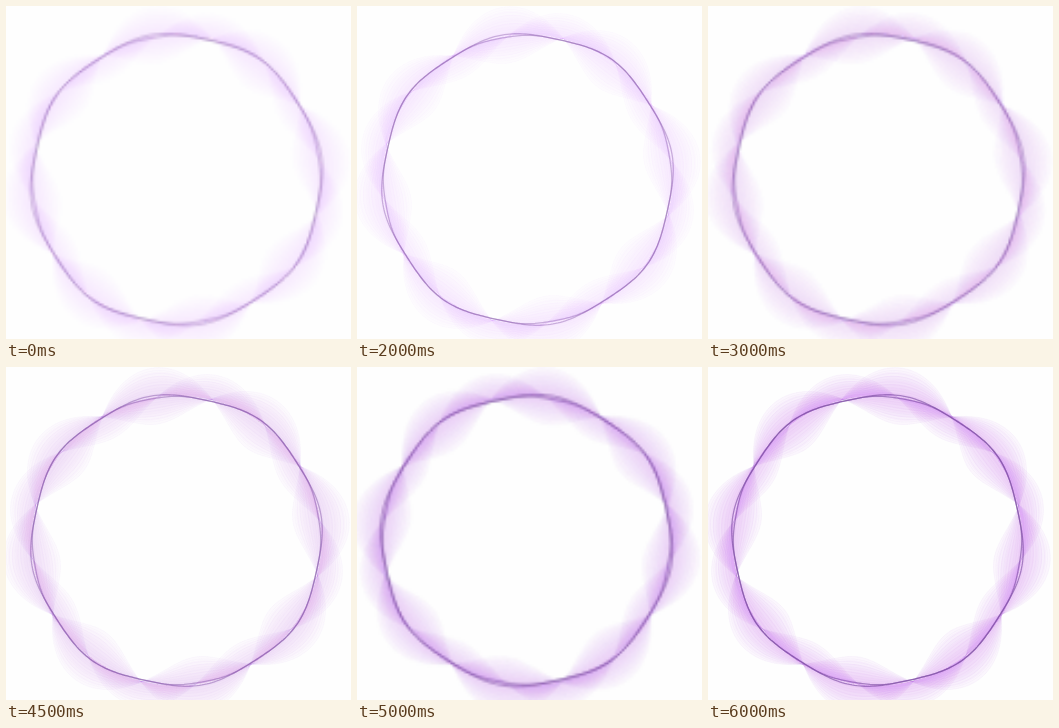
An HTML page with a canvas for the animation above (6.5 s loop, 345 px wide and 333 px high).

```html
<!DOCTYPE html>
<html lang="en">
<head>
<meta charset="utf-8">
<title>Violet ring</title>
<style>
  html, body { margin: 0; width: 100%; height: 100%; overflow: hidden; background: #fefefe; }
  canvas { display: block; width: 345px; height: 333px; }
</style>
</head>
<body>
<canvas id="stage" width="345" height="333"></canvas>
<script>
const W = 345, H = 333, LOOP = 6500, R = 145, TAU = Math.PI * 2, DEG = Math.PI / 180;
const stage = document.getElementById('stage').getContext('2d');
const buffer = document.createElement('canvas');
const ctx = buffer.getContext('2d');

// Each family is a four-lobed wave around the ring: [lobe angle, amplitude]
const families = [[-8, 29], [15, 25], [36, 27]];
const LAYERS = 7, THREADS = 10;

// start time, resolution, veil opacity, line opacity, mirrored
const steps = [
  { at: 0,    res: .45, veil: .018, line: .42 },
  { at: 1000, res: .7,  veil: .019, line: .46 },
  { at: 2000, res: 1,   veil: .021, line: .5 },
  { at: 3000, res: .45, veil: .030, line: .56 },
  { at: 4000, res: .7,  veil: .031, line: .57 },
  { at: 4500, res: 1,   veil: .033, line: .6 },
  { at: 5000, res: .45, veil: .045, line: .78, flip: true },
  { at: 5500, res: .7,  veil: .050, line: .84, flip: true },
  { at: 6000, res: 1,   veil: .050, line: .82, flip: true }
];

function trace(radius) {
  for (let i = 0; i <= 360; i++) {
    const a = i * DEG, r = radius(a);
    ctx[i ? 'lineTo' : 'moveTo'](r * Math.cos(a), r * Math.sin(a));
  }
  ctx.closePath();
}

const lobes = (angle, amp) => a => R + amp * Math.cos(4 * (a - angle * DEG));
const rim = a => R + 1.7 * Math.cos(8 * (a + 10 * DEG));
const innerRim = a => rim(a) - 3 * Math.max(0, Math.cos(4 * (a + 10 * DEG))) ** 4;

function veils(alpha) {
  for (const [angle, amp] of families) {
    ctx.fillStyle = `rgba(185, 105, 222, ${alpha})`;
    for (let k = 1; k <= LAYERS; k++) {
      ctx.beginPath();
      trace(lobes(angle, amp * k / LAYERS));
      ctx.moveTo(R, 0);
      ctx.arc(0, 0, R, 0, TAU);
      ctx.fill('evenodd');
    }
    ctx.strokeStyle = `rgba(170, 100, 205, ${alpha * 1.4})`;
    ctx.lineWidth = .7;
    for (let k = 1; k <= THREADS; k++) {
      ctx.beginPath();
      trace(lobes(angle, amp * k / THREADS));
      ctx.stroke();
    }
  }
}

function rims(alpha, soft) {
  ctx.strokeStyle = `rgba(130, 82, 168, ${alpha * (soft ? .75 : .8)})`;
  ctx.lineWidth = soft ? 2.2 : 1.3;
  for (const radius of [rim, innerRim]) {
    ctx.beginPath();
    trace(radius);
    ctx.stroke();
  }
}

function draw({ res, veil, line, flip }) {
  buffer.width = Math.round(W * res);
  buffer.height = Math.round(H * res);
  ctx.fillStyle = '#fefefe';
  ctx.fillRect(0, 0, buffer.width, buffer.height);
  ctx.scale(buffer.width / W, buffer.height / H);
  ctx.translate(flip ? 169.5 : 170.5, 173.5);
  if (flip) ctx.scale(-1, 1);
  veils(veil);
  rims(line, res < .5);
  stage.drawImage(buffer, 0, 0, W, H);
}

let shown;
function tick(now) {
  const t = now % LOOP;
  const step = steps.findLast(s => t >= s.at);
  if (step !== shown) draw(shown = step);
  requestAnimationFrame(tick);
}
tick(0);
</script>
</body>
</html>
```
